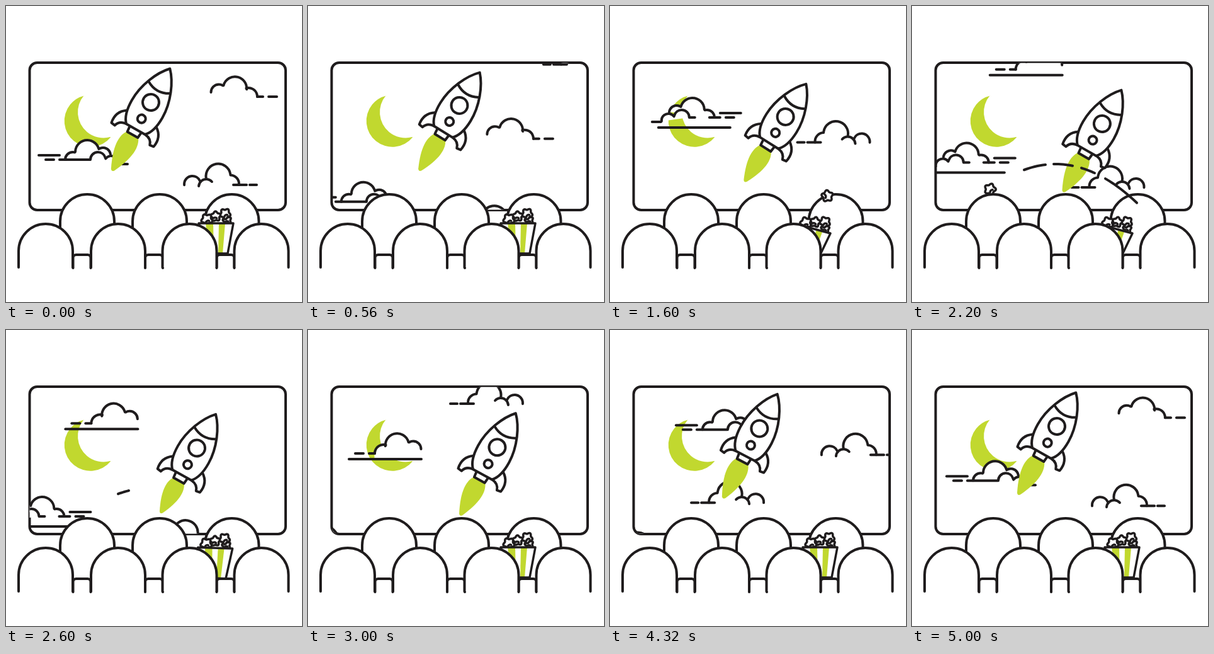
An HTML page with a canvas that plays this animation: 470 px wide and 470 px high, repeating every 5.04 s.

```html
<!DOCTYPE html>
<html>
<head>
<meta charset="utf-8">
<style>
html, body { margin: 0; width: 100%; height: 100%; overflow: hidden; background: #fff; }
canvas { display: block; width: 470px; height: 470px; }
</style>
</head>
<body>
<canvas id="stage" width="470" height="470"></canvas>
<script>
const ctx = document.getElementById('stage').getContext('2d');
const LOOP = 5040, STEP = 40;
const INK = '#1f1c1d', GREEN = '#c1d82f', DEG = Math.PI / 180;

const smooth = p => { p = Math.min(1, Math.max(0, p)); return p * p * (3 - 2 * p); };
const ramp = (t, from, to) => smooth((t - from) / (to - from));

// Cubic interpolation through [time, value] keys; flat at peaks and at both ends.
function curve(keys, t) {
  const slope = i => {
    const a = keys[i - 1], b = keys[i], c = keys[i + 1];
    if (!a || !c || (b[1] - a[1]) * (c[1] - b[1]) <= 0) return 0;
    return (c[1] - a[1]) / (c[0] - a[0]);
  };
  let i = 0;
  while (i < keys.length - 2 && t >= keys[i + 1][0]) i++;
  const [t0, v0] = keys[i], [t1, v1] = keys[i + 1], d = t1 - t0, p = (t - t0) / d;
  const s = smooth(p);
  return v0 + (v1 - v0) * s + d * p * (1 - p) * ((1 - p) * slope(i) - p * slope(i + 1));
}

function shape(build, fill, stroke = true) {
  ctx.beginPath();
  build();
  if (fill) { ctx.fillStyle = fill; ctx.fill(); }
  if (stroke) ctx.stroke();
}
const line = (x0, y0, x1, y1) => shape(() => { ctx.moveTo(x0, y0); ctx.lineTo(x1, y1); });
const arcs = list => list.forEach(([x, y, r, a, b]) => ctx.arc(x, y, r, a * DEG, b * DEG));
const poly = pts => pts.forEach(([x, y], i) => i ? ctx.lineTo(x, y) : ctx.moveTo(x, y));
const circle = (x, y, r) => shape(() => ctx.arc(x, y, r, 0, 7), '#fff');

function at(x, y, angle, flip, draw) {
  ctx.save();
  ctx.translate(x, y);
  ctx.rotate(angle * DEG);
  if (flip) ctx.scale(-1, 1);
  draw();
  ctx.restore();
}

// Each puff is a chain of arcs [x, y, radius, start, end]; dashes are [x0, x1, y].
const puffSmall = [[[12.5, -7, 12.5, 180, 300], [38, -13, 18.7, 195, 364], [59.5, 0, 14, 255, 360]]];
const dashSmall = [[73.5, 82.5, 0], [91.5, 104.5, 0]];
const puffSide = [
  [[54, -14, 19.5, 170, 354], [73, -1.5, 14, 272, 366]],
  [[13, -1, 13, 175, 335]],
  [[35, 3, 12, 185, 318]]
];
const dashSide = [[78, 99, 0], [104, 115, 0]];
const puffBig = [
  [[54, 0, 12, 180, 285], [77, -12, 19, 182, 345], [102, -7, 12, 238, 352]],
  [[94, 0, 12, 180, 343], [115, 5, 11, 217, 365]]
];
const dashBig = [[0, 33, -7], [11, 24, 0], [127, 141, 7]];

const clouds = [
  { t: 0, x: 325.5, y: 144, puffs: puffSmall, dashes: dashSmall },
  { t: 0, x: 283, y: 284, puffs: puffSide, dashes: dashSide },
  { t: 0, x: 52, y: 244, puffs: puffBig, dashes: [...dashBig, [33, 81, 0]] },
  { t: 1080, x: 246, y: 115, flip: true, puffs: puffBig,
    dashes: [...dashBig, [33, 50, 0], [73, 81, 0], [17, 131, 16]] },
  { t: 2200, x: 368.5, y: 288, flip: true, puffs: puffSide, dashes: dashSide },
  { t: 3000, x: 179.5, y: 196, flip: true, puffs: puffSmall,
    dashes: [...dashSmall, [-.5, 114.5, 9]], base: 9 },
  { t: 3000, x: 341, y: 117, flip: true, puffs: puffSide, dashes: dashSide }
];

function drawCloud(c, t) {
  const dt = (t - c.t + LOOP * 1.5) % LOOP - LOOP / 2;
  at(c.x - .0734 * dt, c.y + .1191 * dt, 0, c.flip, () => {
    if (c.base) {
      ctx.fillStyle = '#fff';
      ctx.fillRect(0, -7, 74, c.base + 7);
    }
    c.puffs.forEach(p => shape(() => arcs(p), '#fff'));
    c.dashes.forEach(([a, b, y]) => line(a, y, b, y));
  });
}

function drawMoon() {
  shape(() => {
    ctx.arc(134, 182.5, 41.3, 39 * DEG, 256 * DEG);
    ctx.arc(155, 168.5, 41, 220 * DEG, 75 * DEG, true);
  }, GREEN, false);
}

const travel = [[0, 0], [1080, .39], [2200, .985], [2480, 1], [3000, .965],
  [3600, .72], [4320, .1], [4640, 0], [LOOP, 0]];
const tilt = [[0, 0], [1080, 4], [2200, .2], [3000, -1], [3600, -4], [4320, -2], [LOOP, 0]];

function drawFin() {
  shape(() => {
    ctx.moveTo(27, 30);
    ctx.bezierCurveTo(36, 36, 41, 46, 38.5, 59);
    ctx.lineTo(32, 60);
    ctx.quadraticCurveTo(29, 50, 18, 49);
  }, '#fff');
}

function drawRocket(t) {
  const k = curve(travel, t);
  at(230 + 73 * k, 153 + 34.5 * k, 29.5 + curve(tilt, t), false, () => {
    const flare = 1 - .055 * (1 - Math.cos(t / 720 * 2 * Math.PI));
    ctx.save();
    ctx.translate(0, 56);
    ctx.scale(flare, flare);
    shape(() => {
      ctx.moveTo(-9, 1);
      ctx.bezierCurveTo(-20, 14, -18, 36, -3, 67);
      ctx.quadraticCurveTo(0, 71, 3, 67);
      ctx.bezierCurveTo(18, 36, 20, 14, 9, 1);
    }, GREEN, false);
    ctx.restore();
    drawFin();
    at(0, 0, 0, true, drawFin);
    shape(() => poly([[-10.5, 49], [-9.5, 59], [9.5, 59], [10.5, 49]]), '#fff');
    shape(() => {
      ctx.moveTo(0, -61.5);
      ctx.bezierCurveTo(15, -46, 28, -16, 28, 12);
      ctx.bezierCurveTo(28, 28, 24, 42, 17, 49);
      ctx.lineTo(-17, 49);
      ctx.bezierCurveTo(-24, 42, -28, 28, -28, 12);
      ctx.bezierCurveTo(-28, -16, -15, -46, 0, -61.5);
      ctx.closePath();
    }, '#fff');
    shape(() => { ctx.moveTo(-19, -27); ctx.quadraticCurveTo(0, -16, 19, -27); });
    circle(0, 0, 13);
    circle(0, 30, 6.5);
  });
}

function drawKernel(x, y, r, turn) {
  at(x, y, turn, false, () => {
    shape(() => {
      for (let a = 0; a < 360; a += 10) {
        const q = r * (1 + .16 * Math.cos(a * 5 * DEG));
        ctx.lineTo(q * Math.cos(a * DEG), q * Math.sin(a * DEG));
      }
      ctx.closePath();
    }, '#fff');
    shape(() => ctx.arc(r * .5, r * .6, r * .5, 180 * DEG, 270 * DEG));
  });
}

function drawBucket(t) {
  const k = ramp(t, 640, 960) - ramp(t, 2320, 2680);
  at(361 - 11 * k, 345 + 16 * k, 15 * k, false, () => {
    drawKernel(-10, -5, 6, 40);
    drawKernel(-13, -15, 7.5, 15);
    drawKernel(-28, -11, 7, 50);
    drawKernel(-42, -6, 8, 20);
    const cup = () => { poly([[-55, 0], [0, 0], [-9, 48], [-46, 48]]); ctx.closePath(); };
    shape(cup, '#fff', false);
    shape(() => poly([[-44, 0], [-32, 0], [-31, 48], [-38, 48]]), GREEN, false);
    shape(() => poly([[-23, 0], [-13, 0], [-17, 48], [-24, 48]]), GREEN, false);
    shape(cup);
  });
}

// The tossed kernel follows a parabola with its top at x = 228.
const arcY = x => 251 + .0037 * (x - 228) ** 2;
const tossX = t => 345 - 221 * (t - 1600) / 600;
const tossing = t => t >= 1600 && t < 2360;

function drawTossed(t, falling) {
  const x = tossX(t);
  if (tossing(t) && (x < 228) === falling) drawKernel(x, arcY(x), 8, (t - 2200) * .4);
}

function drawTrail(t) {
  if (t < 1640 || t > 2640) return;
  const head = Math.max(178, tossX(t) + 54);
  const tail = 357 - 180 * Math.max(0, (t - 2240) / 400);
  [[307, 357], [269, 290], [225, 255], [178, 212]].forEach(([a, b]) => {
    const from = Math.max(a, head), to = Math.min(b, tail);
    if (from >= to) return;
    shape(() => {
      for (let i = 0; i <= 8; i++) {
        const x = from + (to - from) * i / 8;
        ctx.lineTo(x, arcY(x));
      }
    });
  });
}

function drawSeat(x, top, bottom) {
  shape(() => {
    ctx.moveTo(x - 43, bottom);
    ctx.arc(x, top + 43, 43, Math.PI, 0);
    ctx.lineTo(x + 43, bottom);
  }, '#fff');
}

function drawArmrest(x) {
  shape(() => {
    ctx.moveTo(x - 14, 416);
    ctx.arcTo(x - 14, 395, x, 395, 5);
    ctx.arcTo(x + 14, 395, x + 14, 416, 5);
    ctx.lineTo(x + 14, 416);
  }, '#fff');
}

function render(t) {
  ctx.fillStyle = '#fff';
  ctx.fillRect(0, 0, 470, 470);
  ctx.strokeStyle = INK;
  ctx.lineWidth = 4;
  ctx.lineJoin = ctx.lineCap = 'round';

  shape(() => ctx.roundRect(37.5, 90, 406.5, 234, 12), '#fff');
  drawMoon();
  ctx.save();
  ctx.beginPath();
  ctx.roundRect(37.5, 90.5, 405.5, 233, 10);
  ctx.clip();
  clouds.forEach(c => drawCloud(c, t));
  ctx.restore();
  drawRocket(t);

  ctx.lineWidth = 3.5;
  drawTossed(t, true);
  ctx.lineWidth = 4;
  [129, 244, 358.5].forEach(x => drawSeat(x, 299, 395));
  drawTrail(t);
  ctx.lineWidth = 3.5;
  drawTossed(t, false);
  drawBucket(t);
  ctx.lineWidth = 4;
  [120.5, 235, 348.5].forEach(drawArmrest);
  [63, 178, 291.5, 405.5].forEach(x => drawSeat(x, 346, 415));
}

const start = performance.now();
function tick() {
  const t = (performance.now() - start) % LOOP;
  render(Math.floor(t / STEP) * STEP);
  requestAnimationFrame(tick);
}
tick();
</script>
</body>
</html>
```
